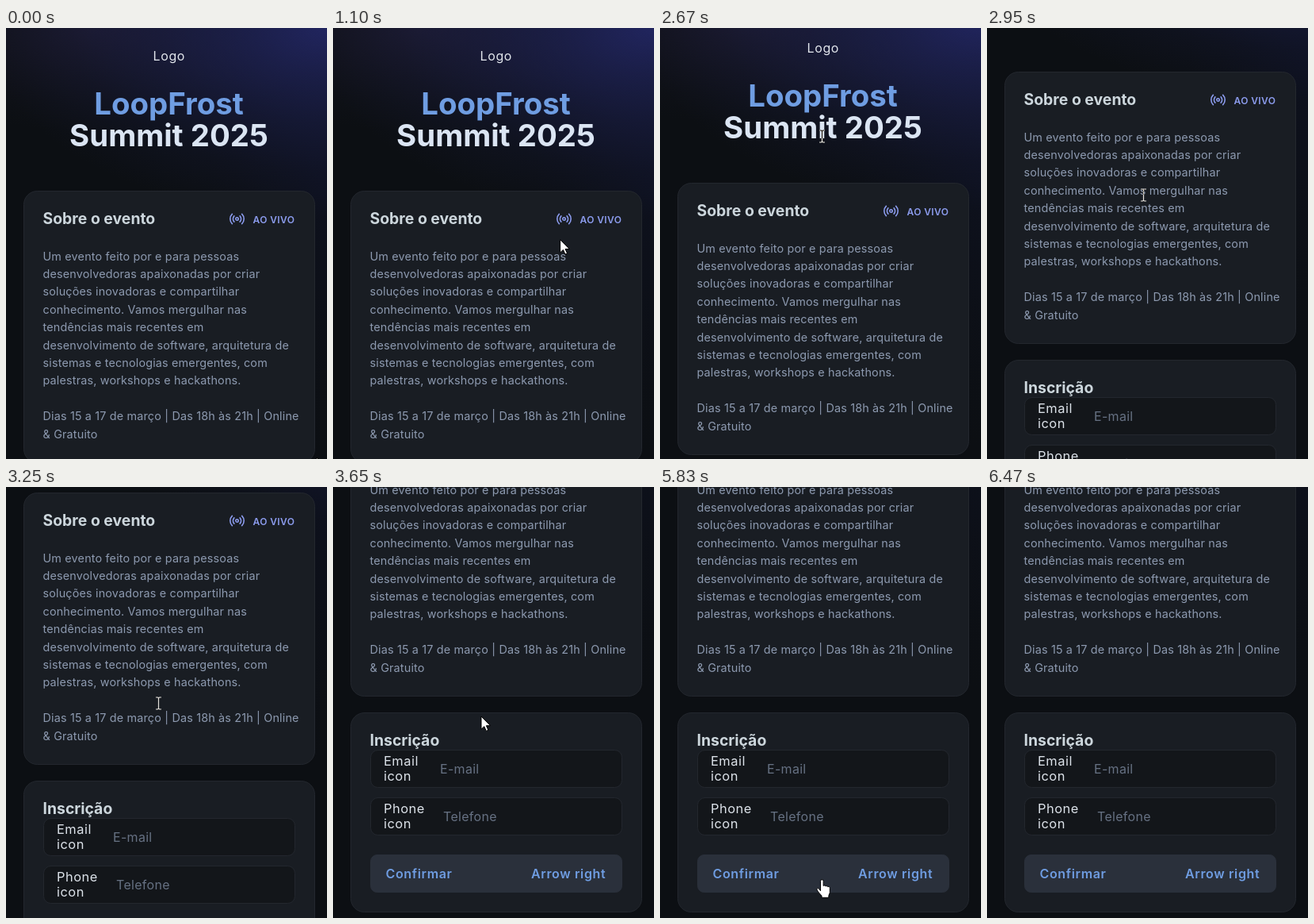
An HTML page with a canvas that plays this animation: 405x543 px, repeating every 7400 ms.

```html
<!DOCTYPE html>
<html lang="pt-BR">
<head>
<meta charset="utf-8">
<title>LoopFrost Summit 2025</title>
<style>
  html, body { margin: 0; width: 100%; height: 100%; overflow: hidden; background: #0c0f13; }
  canvas { display: block; width: 405px; height: 543px; }
</style>
</head>
<body>
<canvas id="stage"></canvas>
<script>
const W = 405, H = 543, LOOP = 7400;
const canvas = document.getElementById('stage');
const ctx = canvas.getContext('2d');
const dpr = window.devicePixelRatio || 1;
canvas.width = W * dpr;
canvas.height = H * dpr;

const BLUE = '#6f9de2', LIGHT = '#dbe5f3', HEAD = '#ccd6dc', LABEL = '#dde3ea';
const BODY = '#8d9ab0', LIVE = '#8c9cee', HINT = '#667183', BORDER = '#23272e';

// Page layout: tops of the blocks and the shared inner column
const LEFT = 47, INNER = 318, ROW = 48, LINE = 22.4;
const TITLE = 76, ABOUT = 205, BODY_TOP = 277, SIGNUP = 568;
const FIELDS = [SIGNUP + 47, SIGNUP + 107], BUTTON = SIGNUP + 179;

const PARAGRAPH = [
  'Um evento feito por e para pessoas',
  'desenvolvedoras apaixonadas por criar',
  'soluções inovadoras e compartilhar',
  'conhecimento. Vamos mergulhar nas',
  'tendências mais recentes em',
  'desenvolvimento de software, arquitetura de',
  'sistemas e tecnologias emergentes, com',
  'palestras, workshops e hackathons.',
  '',
  'Dias 15 a 17 de março | Das 18h às 21h | Online',
  '& Gratuito'
];

const ARROW = new Path2D('M0 0V16.2L3.8 12.7L6.3 18.4L8.9 17.3L6.4 11.7H11.6Z');
const HAND = new Path2D('M5 14.5V2.2a1.8 1.8 0 0 1 3.6 0V8.2a1.7 1.7 0 0 1 2.9.6 ' +
  '1.7 1.7 0 0 1 2.8.7 1.6 1.6 0 0 1 2.5 1.5V16c0 2-1.5 3.5-1.5 5v2H6.5v-2' +
  'C5 18.5 2 16.5.6 13.2c-.6-1.8 1.4-2.6 2.6-1.2z');
const CARET = new Path2D('M-3.5 -7.5H-1L0 -6.5L1 -7.5H3.5M0 -6.5V6.5M-3.5 7.5H-1L0 6.5L1 7.5H3.5');

function ease(t, from, to) {
  const p = Math.min(1, Math.max(0, (t - from) / (to - from)));
  return p * p * (3 - 2 * p);
}

function scrollAt(t) {
  return Math.round(10 * ease(t, 2000, 2270) + 188 * ease(t, 2670, 3090) + 86 * ease(t, 3240, 3560));
}

function pointerAt(t) {
  let x = 392, y = 541;
  const glide = (from, to, endX, endY) => {
    const e = ease(t, from, to);
    x += (endX - x) * e;
    y += (endY - y) * e;
  };
  glide(60, 430, 270, 283);
  glide(430, 680, 299, 287);
  glide(900, 1790, 204, 131);
  glide(2600, 3250, 192, 272);
  glide(3250, 3650, 187, 289);
  glide(3700, 4400, 219, 519);
  glide(4400, 4640, 200, 493);
  glide(5770, 6460, 360, 552);
  return [x, y];
}

function text(str, x, y, size, color, { weight = 400, gap = 0, align = 'left' } = {}) {
  ctx.font = `${weight} ${size}px Inter, "Open Sans", sans-serif`;
  ctx.letterSpacing = gap + 'px';
  ctx.textAlign = align;
  ctx.fillStyle = color;
  ctx.fillText(str, x, y);
}

function box(x, y, w, h, radius, fill, border = fill) {
  ctx.beginPath();
  ctx.roundRect(x + 0.5, y + 0.5, w - 1, h - 1, radius);
  ctx.fillStyle = fill;
  ctx.strokeStyle = border;
  ctx.lineWidth = 1;
  ctx.fill();
  ctx.stroke();
}

function glow(x, y, rx, ry, rgb, alpha) {
  ctx.save();
  ctx.translate(x, y);
  ctx.scale(rx, ry);
  const g = ctx.createRadialGradient(0, 0, 0, 0, 0, 1);
  for (let r = 0; r <= 1; r += 0.25) g.addColorStop(r, `rgba(${rgb}, ${alpha * (1 - r) ** 1.4})`);
  ctx.fillStyle = g;
  ctx.fillRect(-1, -1, 2, 2);
  ctx.restore();
}

function background() {
  ctx.fillStyle = '#0c0f13';
  ctx.fillRect(0, 0, W, 840);
  glow(W, 210, 150, 330, '16, 20, 48', 0.35);
  glow(110, 0, 300, 130, '34, 30, 56', 0.6);
  glow(W, 0, 430, 240, '34, 38, 98', 0.95);
}

function liveIcon(x, y) {
  ctx.strokeStyle = LIVE;
  ctx.lineWidth = 1.6;
  ctx.lineCap = 'round';
  const arc = (r, mid, half) => {
    ctx.beginPath();
    ctx.arc(x, y, r, mid - half, mid + half);
    ctx.stroke();
  };
  arc(1.7, 0, Math.PI);
  for (const r of [5.1, 8.7]) {
    for (const mid of [0, Math.PI]) arc(r, mid, Math.PI / 4);
  }
}

function field(y, label, hint, hintX) {
  box(LEFT, y, INNER, ROW, 9, '#13161a', BORDER);
  text(label, 64, y + 20, 16.4, LABEL, { gap: 0.5 });
  text('icon', 64, y + 39, 16.4, LABEL, { gap: 0.5 });
  text(hint, hintX, y + 30, 16, HINT, { gap: 0.3 });
}

function card(y, h, heading) {
  box(22, y, 368, h, 17, '#191d23', BORDER);
  text(heading, LEFT - 0.5, y + 42, 19.4, HEAD, { weight: 700 });
}

function page() {
  background();
  const title = { weight: 700, align: 'center' };
  text('Logo', 205.8, 41, 16, '#e2e6ec', { gap: 0.6, align: 'center' });
  text('LoopFrost', 205.5, TITLE + 33, 38.4, BLUE, title);
  text('Summit 2025', 205.5, TITLE + 73, 38.4, LIGHT, title);

  card(ABOUT, 343, 'Sobre o evento');
  liveIcon(291.5, ABOUT + 35.5);
  text('AO VIVO', 311.5, ABOUT + 41, 12, LIVE, { weight: 600, gap: 0.4 });
  PARAGRAPH.forEach((line, i) => {
    text(line, LEFT - 0.5, Math.floor(BODY_TOP + 16.05 + LINE * i), 14.4, BODY, { gap: 0.16 });
  });

  card(SIGNUP, 252, 'Inscrição');
  field(FIELDS[0], 'Email', 'E-mail', 135);
  field(FIELDS[1], 'Phone', 'Telefone', 139);
  box(LEFT, BUTTON, INNER, ROW, 8, '#2a303b');
  const action = { weight: 600, gap: 0.65 };
  text('Confirmar', 66.5, BUTTON + 30, 16, BLUE, action);
  text('Arrow right', 250, BUTTON + 30, 16, BLUE, action);
}

function outlined(path) {
  ctx.lineJoin = 'round';
  ctx.lineWidth = 1;
  ctx.fillStyle = '#fff';
  ctx.strokeStyle = '#000';
  ctx.fill(path);
  ctx.stroke(path);
}

// The pointer is a hand on the button, a caret on text and inputs, else an arrow.
function pointer(x, y, scroll) {
  const over = (top, height) =>
    x > LEFT && x < LEFT + INNER && y + scroll >= top && y + scroll <= top + height;
  const onText = over(TITLE, 80) || over(BODY_TOP, LINE * PARAGRAPH.length) ||
    FIELDS.some(top => over(top, ROW));
  ctx.save();
  if (over(BUTTON, ROW)) {
    ctx.translate(x - 6, y);
    outlined(HAND);
  } else if (onText) {
    // Inverts what lies beneath
    ctx.globalCompositeOperation = 'difference';
    ctx.translate(Math.round(x) + 0.5, Math.round(y) + 0.5);
    ctx.lineCap = 'butt';
    ctx.lineWidth = 1.2;
    ctx.strokeStyle = '#fff';
    ctx.stroke(CARET);
  } else {
    ctx.translate(x, y);
    outlined(ARROW);
  }
  ctx.restore();
}

function draw(t) {
  const scroll = scrollAt(t);
  ctx.setTransform(dpr, 0, 0, dpr, 0, 0);
  ctx.save();
  ctx.translate(0, -scroll);
  page();
  ctx.restore();
  pointer(...pointerAt(t), scroll);
}

const start = performance.now();
function tick() {
  draw((performance.now() - start) % LOOP);
  requestAnimationFrame(tick);
}
tick();
</script>
</body>
</html>
```
